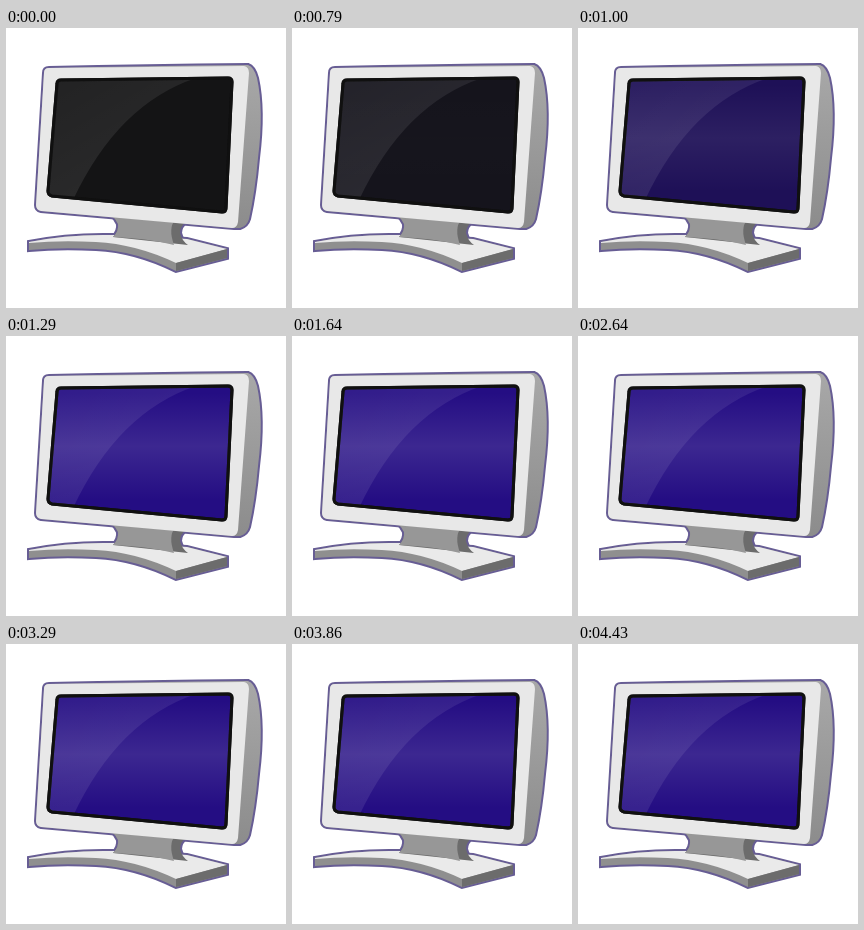
These frames come from a looping animation (280x280 px, 4.5 s). An HTML page:

```html
<!DOCTYPE html>
<html lang="en">
<head>
<meta charset="utf-8">
<title>Monitor switching on</title>
<style>
  html, body { margin: 0; width: 100%; height: 100%; overflow: hidden; background: #fff; }
  svg { display: block; width: 100vw; height: 100vh; }
</style>
</head>
<body>
<svg viewBox="0 0 280 280">
  <defs>
    <path id="case" d="M43 40 Q140 38 242 37 Q248 39 251 50 Q258 82 252 130 Q249 164 243 191 Q241 198 234 200 L228 200 L35 183 Q30 182 30 177 L38 45 Q38 40 43 40Z"/>
    <path id="neck" d="M104 186 L181 193 Q174 198 174 205 Q176 213 182 217 L107 209 Q113 203 112 196 Q109 190 104 186Z"/>
    <path id="base" d="M23 214 Q62 206 107 207 L181 211 L221 221 V230 L170 243 Q130 223 90 221 Q54 219 23 222Z"/>
    <path id="pane" d="M55 52 L222 50 Q226 50 226 54 L220 180 Q220 184 216 184 L46 168 Q42 167 42 163 L51 56 Q51 52 55 52Z"/>
    <clipPath id="inside"><use href="#pane"/></clipPath>
    <linearGradient id="side" x2="0" y2="1">
      <stop stop-color="#a8a8a8"/><stop offset="1" stop-color="#8c8c8c"/>
    </linearGradient>
    <linearGradient id="shine" x1="0" y1="0" x2=".7" y2="1">
      <stop stop-color="#fff" stop-opacity=".06"/><stop offset="1" stop-color="#fff" stop-opacity=".1"/>
    </linearGradient>
    <linearGradient id="glow" x2="0" y2="1">
      <stop offset=".05" stop-color="#fff" stop-opacity="0"/>
      <stop offset=".45" stop-color="#fff" stop-opacity=".11"/>
      <stop offset=".85" stop-color="#fff" stop-opacity="0"/>
    </linearGradient>
  </defs>

  <g fill="none" stroke="#675d94" stroke-width="4">
    <use href="#case"/><use href="#neck"/><use href="#base"/>
  </g>

  <use href="#base" fill="#8f8f8f"/>
  <path d="M23 214 Q62 206 107 207 L181 211 L221 221 L170 235 Q130 216 90 214 Q54 212 23 215Z" fill="#eaeaea"/>
  <path d="M170 235 L221 221 V230 L170 243Z" fill="#6c6c6c"/>
  <use href="#neck" fill="#6c6c6c"/>
  <path d="M104 186 L169 192 Q162 200 168 217 Q140 210 107 209 Q113 203 112 196 Q109 190 104 186Z" fill="#979797"/>

  <use href="#case" fill="url(#side)"/>
  <path d="M43 40 L238 38 Q243 39 243 45 L232 194 Q231 200 226 200 L35 183 Q30 182 30 177 L38 45 Q38 40 43 40Z" fill="#e8e8e8"/>
  <use href="#pane" id="screen" stroke="#101010" stroke-width="3"/>
  <g clip-path="url(#inside)">
    <rect id="band" x="42" y="50" width="184" height="134" fill="url(#glow)"/>
    <path d="M40 50 H190 Q112 76 67 172 H40Z" fill="url(#shine)"/>
  </g>
  <use href="#pane" fill="none" stroke="#101010" stroke-width="3"/>
</svg>
<script>
  const LOOP = 4500, STEP = 1000 / 14;
  const OFF = [20, 20, 21], ON = [36, 13, 131];
  const screen = document.getElementById("screen");
  const band = document.getElementById("band");

  const smooth = (t, from, to) => {
    const k = Math.min(1, Math.max(0, (t - from) / (to - from)));
    return k * k * (3 - 2 * k);
  };

  function draw(now) {
    const t = Math.floor((now % LOOP) / STEP) * STEP;
    const k = smooth(t, 710, 1220);
    screen.setAttribute("fill", `rgb(${OFF.map((c, i) => Math.round(c + (ON[i] - c) * k))})`);
    band.setAttribute("opacity", k);
    requestAnimationFrame(draw);
  }
  draw(performance.now());
</script>
</body>
</html>
```
